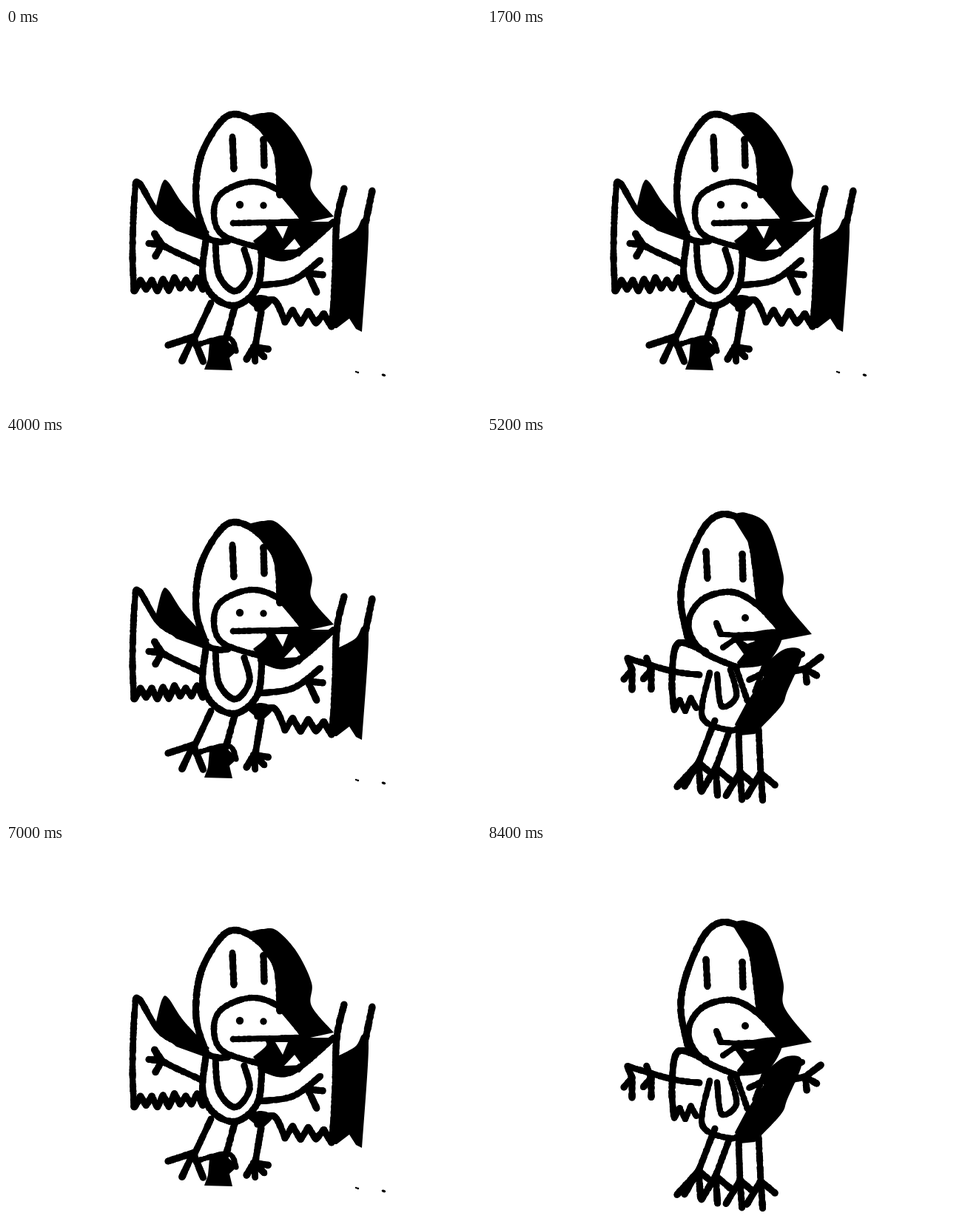
An HTML page with a canvas that plays this animation: 642 by 514 pixels, repeating every 8500 ms.

```html
<!DOCTYPE html>
<html lang="en">
<head>
<meta charset="utf-8">
<title>Bird costume dance</title>
<style>
html, body { margin: 0; width: 100%; height: 100%; overflow: hidden; background: #fff; }
canvas { display: block; }
</style>
</head>
<body>
<canvas id="stage" width="642" height="514"></canvas>
<script>
const W = 642, H = 514, STEP = 100;
let ink, seed;

function rnd() {
  seed = (seed * 16807) % 2147483647;
  return seed / 2147483647;
}

function dot(x, y, r) {
  ink.beginPath();
  ink.arc(x, y, r, 0, Math.PI * 2);
  ink.fill();
}

const spline = (a, b, c, d, t) =>
  b + 0.5 * t * (c - a + t * (2 * a - 5 * b + 4 * c - d + t * (3 * (b - c) + d - a)));

// Calls put(x, y) along a smooth curve through the points
function trace(p, put) {
  const last = p.length / 2 - 1;
  const at = (i, k) => p[2 * Math.max(0, Math.min(last, i)) + k];
  for (let i = 0; i < last; i++) {
    const steps = Math.ceil(Math.hypot(at(i + 1, 0) - at(i, 0), at(i + 1, 1) - at(i, 1)) / 1.5);
    for (let s = 0; s <= steps; s++) {
      const [x, y] = [0, 1].map(k =>
        spline(at(i - 1, k), at(i, k), at(i + 1, k), at(i + 2, k), s / steps));
      put(x, y);
    }
  }
}

// Marker stroke with a slightly uneven edge
function pen(w, p) {
  trace(p, (x, y) => dot(x, y, w / 2 + (rnd() - 0.5) * 0.9));
}

// Filled shape: a curved side, then straight corners
function blob(curve, corners = [], color = "#000") {
  ink.fillStyle = color;
  ink.beginPath();
  trace(curve, (x, y) => ink.lineTo(x, y));
  for (let i = 0; i < corners.length; i += 2) ink.lineTo(corners[i], corners[i + 1]);
  ink.fill();
  ink.fillStyle = "#000";
}

// Feather edge: n uneven teeth of height h
function jag(w, x0, y0, x1, y1, n, h) {
  let px = x0, py = y0;
  for (let i = 1; i <= 2 * n; i++) {
    const t = i / (2 * n);
    const x = x0 + (x1 - x0) * t;
    const y = y0 + (y1 - y0) * t - (i % 2) * h + (rnd() - 0.5) * h * 0.3;
    pen(w, [px, py, x, y]);
    px = x;
    py = y;
  }
}

function claw(x, y, len, ...degrees) {
  for (const deg of degrees) {
    const a = deg * Math.PI / 180;
    pen(9, [x, y, x + len * Math.cos(a), y + len * Math.sin(a)]);
  }
}

function spread() {
  // hood
  blob([328, 119, 347, 115, 366, 117, 393, 146, 413, 188, 413, 219, 443, 255],
    [402, 264, 368, 224, 364, 168]);
  pen(9, [271, 284, 257, 235, 263, 175, 290, 127, 314, 117, 345, 135, 366, 168, 370, 226]);
  pen(9, [306, 147, 308, 191]);
  pen(9, [348, 151, 349, 186]);
  // face
  pen(8, [402, 259, 370, 221, 332, 208, 292, 223, 281, 250, 293, 280, 345, 298]);
  dot(316, 239, 5.2);
  dot(348, 240, 4.7);
  blob([345, 262, 352, 272, 334, 288], [345, 304, 370, 310, 397, 309, 440, 262]);
  pen(8, [307, 264, 400, 262]);
  blob([364, 268, 381, 268], [374, 285], "#fff");
  blob([376, 300, 390, 285], [400, 299], "#fff");
  // left wing
  blob([203, 240, 211, 210, 219, 208, 240, 239, 275, 276], [266, 287, 230, 274, 212, 258]);
  pen(8.5, [173, 356, 171, 300, 174, 225, 180, 210, 212, 257, 270, 282]);
  jag(9, 174, 356, 266, 352, 6, 14);
  pen(8.5, [264, 319, 212, 294, 201, 278]);
  claw(211, 293, 18, 120, 185, 235);
  // body
  pen(9, [264, 281, 285, 289, 300, 288]);
  pen(9, [270, 288, 266, 335, 282, 365, 312, 375, 340, 350, 346, 303]);
  pen(8.5, [283, 292, 288, 335, 310, 356, 329, 332, 322, 300]);
  // right wing
  pen(8.5, [344, 303, 385, 309, 443, 262]);
  pen(8.5, [343, 348, 388, 341, 425, 314]);
  claw(408, 332, 20, 5);
  claw(408, 332, 28, 65);
  pen(9, [457, 217, 447, 262, 445, 330, 441, 402]);
  blob([444, 289, 472, 274, 482, 258, 490, 275, 481, 411],
    [473, 407, 464, 393, 447, 406, 439, 406]);
  pen(9, [495, 220, 485, 268]);
  blob([322, 367, 345, 361, 361, 369, 345, 386]);
  pen(9, [340, 379, 362, 368, 377, 397]);
  jag(9, 377, 398, 440, 403, 3, 18);
  // legs
  pen(8.5, [277, 372, 255, 419]);
  pen(9, [309, 378, 297, 422]);
  pen(9, [345, 383, 337, 430]);
  claw(253, 418, 36, 162, 115, 68);
  pen(7, [256, 429, 300, 419, 311, 437]);
  blob([275, 426, 296, 422, 312, 437], [302, 446, 306, 463, 268, 462, 273, 448]);
  claw(335, 431, 20, 120, 85, 45, 10);
  pen(2.5, [473, 465, 476, 466]);
  pen(2.5, [509, 469, 512, 470]);
}

function turned() {
  // hood
  blob([330, 109, 350, 104, 378, 117, 386, 165, 398, 219, 437, 264],
    [400, 268, 384, 240, 367, 226, 358, 150]);
  pen(9, [272, 282, 257, 255, 264, 178, 287, 128, 325, 111, 354, 132, 367, 224]);
  pen(4, [395, 225, 416, 233]);
  pen(9, [304, 153, 297, 175, 302, 191]);
  pen(8.5, [340, 150, 338, 215]);
  // face
  pen(8.5, [400, 260, 368, 228, 350, 217, 325, 219, 291, 251, 292, 286, 350, 310]);
  dot(322, 253, 5);
  dot(352, 244, 5);
  blob([338, 268, 402, 262, 390, 291, 347, 318], [345, 309, 361, 292, 338, 284]);
  pen(7.5, [298, 283, 345, 266, 425, 264]);
  blob([359, 271, 368, 272, 362, 283], [], "#fff");
  pen(6, [330, 305, 352, 288]);
  pen(8, [264, 277, 285, 286, 302, 280]);
  // body and wing
  pen(9, [270, 280, 270, 350, 290, 389, 345, 388]);
  pen(8, [375, 300, 371, 325, 358, 372]);
  pen(6, [372, 299, 384, 299, 395, 345]);
  blob([386, 296, 408, 286, 428, 335, 431, 378], [405, 384, 392, 376, 396, 345]);
  jag(9, 336, 390, 360, 396, 2, 20);
  jag(9, 360, 398, 406, 405, 2, 28);
  pen(9, [406, 405, 412, 380, 388, 380]);
  // legs
  pen(9, [294, 384, 262, 462]);
  claw(255, 461, 45, 144);
  claw(255, 461, 32, 116, 94, 70);
  blob([350, 392, 346, 425, 338, 462, 355, 485],
    [342, 490, 340, 501, 298, 500, 306, 462, 315, 394]);
}

function arms() {
  // hood
  blob([330, 107, 350, 104, 380, 122, 400, 185, 402, 221, 439, 268],
    [398, 276, 394, 260, 368, 225, 360, 155]);
  pen(9, [274, 283, 262, 225, 270, 175, 296, 120, 325, 106, 354, 130, 368, 222]);
  pen(9, [296, 156, 298, 193]);
  pen(9, [345, 160, 346, 194]);
  // face
  pen(8.5, [396, 261, 365, 228, 330, 211, 290, 222, 272, 255, 290, 290, 338, 313]);
  dot(349, 246, 5);
  pen(8.5, [310, 253, 316, 268]);
  pen(7, [315, 268, 340, 269, 410, 267]);
  pen(7.5, [319, 286, 335, 275]);
  blob([338, 269, 398, 263, 380, 306, 340, 314], [338, 306, 347, 295, 335, 278]);
  blob([346, 277, 362, 277, 352, 281], [], "#fff");
  // left arm
  pen(8.5, [191, 301, 250, 318, 287, 323]);
  for (const x of [196, 222]) {
    claw(x, 316, 27, 90);
    claw(x, 316, 17, 130, 248);
  }
  // body
  pen(9, [296, 292, 258, 281, 250, 330, 253, 370]);
  jag(8, 253, 371, 283, 370, 2, 15);
  pen(8, [301, 320, 291, 380, 328, 398, 345, 391]);
  pen(8, [311, 322, 317, 365, 337, 352, 329, 316]);
  pen(8, [336, 312, 352, 358]);
  // shaded side and right arm
  blob([374, 310, 403, 288, 426, 294, 406, 345, 397, 366, 362, 403],
    [342, 405, 335, 390, 350, 362, 374, 326]);
  pen(7, [377, 305, 362, 346]);
  pen(8, [354, 330, 426, 295]);
  pen(9, [405, 320, 430, 315]);
  claw(430, 315, 27, 323);
  claw(430, 315, 18, 30, 83);
  // legs
  for (const [hip, y, foot, ground] of
    [[308, 385, 286, 442], [328, 398, 309, 449], [340, 400, 342, 455], [367, 395, 370, 456]]) {
    pen(8.5, [hip, y, foot, ground]);
    claw(foot, ground, 37, 121, 86);
    claw(foot, ground, 25, 40);
  }
  claw(286, 442, 44, 132);
}

function render(draw) {
  const sheet = document.createElement("canvas");
  sheet.width = W;
  sheet.height = H;
  ink = sheet.getContext("2d");
  seed = 4711;
  ink.fillStyle = "#fff";
  ink.fillRect(0, 0, W, H);
  ink.fillStyle = "#000";
  draw();
  return sheet;
}

const poses = [spread, turned, arms].map(render);

// The poses turn steadily, with a freer break in the middle
const STEPS = 85, BREAK = 28, PACE = 18 / 17;
const solo = "2121222" + "0200000" + "12012011";

function poseAt(step) {
  const inBreak = step - BREAK;
  if (inBreak >= 0 && inBreak < solo.length) return +solo[inBreak];
  return (Math.floor(step * PACE) + (inBreak > 0 ? 1 : 0)) % 3;
}

const stage = document.getElementById("stage").getContext("2d");
const start = performance.now();

function tick() {
  const step = Math.floor((performance.now() - start) / STEP) % STEPS;
  stage.drawImage(poses[poseAt(step)], 0, 0);
  requestAnimationFrame(tick);
}
tick();
</script>
</body>
</html>
```
